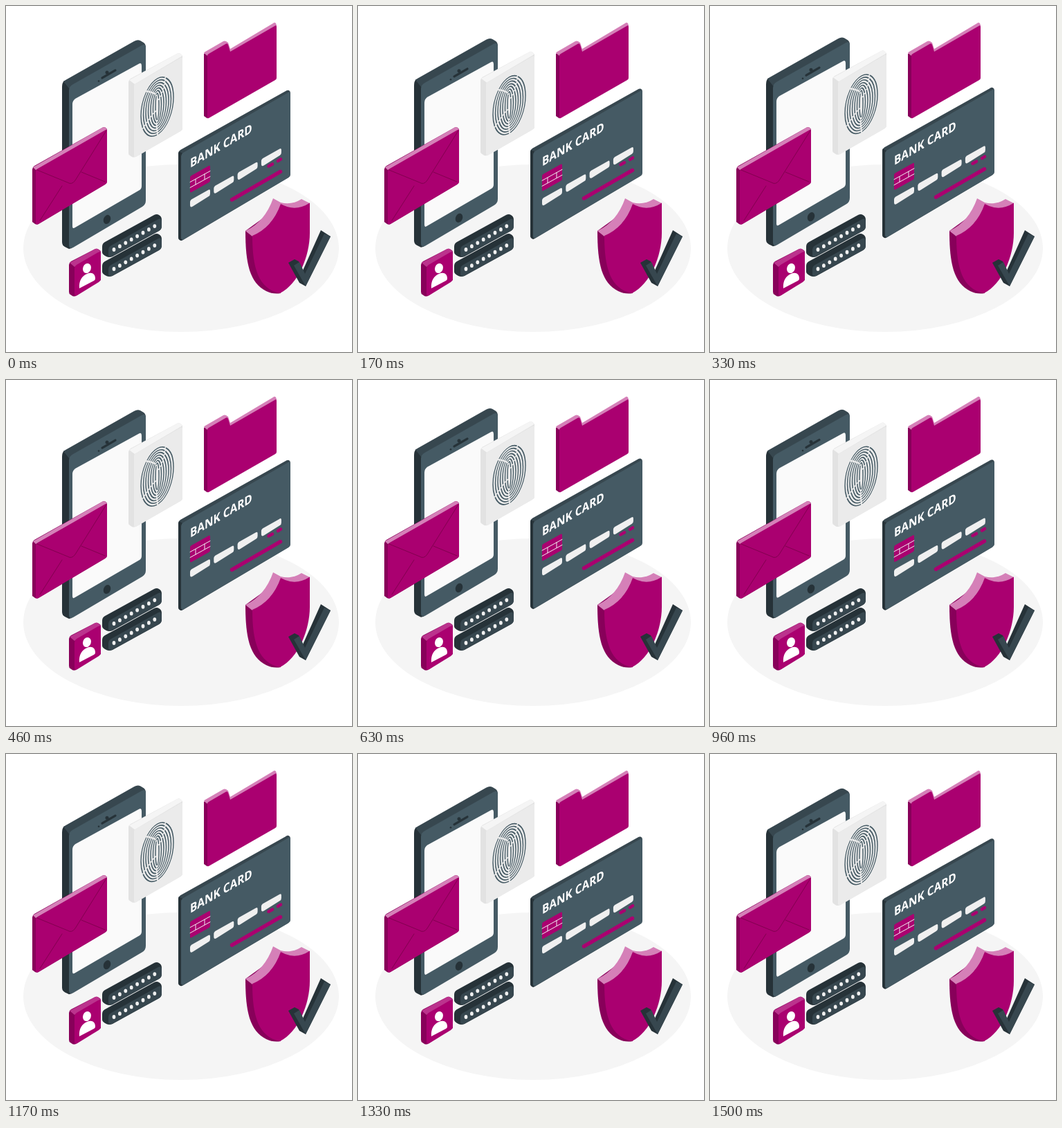
Recreate the animation shown at these times as an HTML page. Size 500x500 px, loop 1540 ms.

```html
<!DOCTYPE html>
<html lang="en">
<head>
<meta charset="utf-8">
<style>
html, body { margin: 0; height: 100%; overflow: hidden; background: #fff; }
svg { display: block; width: 100vw; height: 100vh; }
.front { fill: #455a64; }
.dark { fill: #37474f; }
.darkest { fill: #263238; }
.pink { fill: #aa0070; }
.pink-side { fill: #88005a; }
.pink-top { fill: #d580b8; }
.light { fill: #f0f0f0; }
.line { fill: none; stroke-linecap: round; stroke-linejoin: round; }
text { font: 600 17.8px "Noto Sans", "Open Sans", sans-serif; fill: #fff; }
</style>
</head>
<body>
<svg viewBox="0 0 500 500">
  <ellipse cx="253" cy="350" rx="228" ry="121" fill="#f5f5f5"/>

  <g class="float">
    <!-- phone -->
    <path class="darkest" d="M81 117Q81 111 84 108L95 113V350L91 351L85 348Q81 346 81 341Z"/>
    <path class="dark" d="M83 109L86 107L185 51Q190 48 194 50L199 53Q202 55 202 60L97 120L91 119Z"/>
    <path class="front" d="M91 122Q91 116 97 113L196 57Q202 54 202 61V281Q202 287 197 290L97 349Q91 352 91 345Z"/>
    <path fill="#fafafa" d="M96 142Q96 137 100 134L192 83.500Q196 81 196 87V260Q196 264 193 266L100 320Q96 323 96 318Z"/>
    <g class="darkest">
      <circle cx="146" cy="96" r="2.500"/>
      <circle cx="134" cy="108.500" r="1.300"/>
      <ellipse cx="146" cy="308.500" rx="5" ry="6.800" transform="rotate(22 146 308.500)"/>
    </g>
    <path class="line" stroke="#263238" stroke-width="3.200" d="M139 104L158 93"/>

    <!-- fingerprint tile -->
    <path fill="#e2e2e2" d="M177 110Q177 107 180 105L247 69Q250 67 252 69L255 72V177Q255 179 252 181L187 218Q184 219 182 218L179 216Q177 215 177 213Z"/>
    <path fill="#f5f5f5" d="M178 107L247 69Q250 67 252 69L255 72L186 113Z"/>
    <path fill="#ebebeb" d="M185 115Q185 113 188 112L252 75Q255 73 255 76V177Q255 179 252 181L188 218Q185 219 185 216Z"/>
    <g id="print" class="line" stroke="#455a64" stroke-width="1.400" transform="matrix(1 -.577 0 1 218.500 145.500)"/>
  </g>

  <!-- envelope -->
  <path class="pink-side" d="M38 236Q38 233 41 231L139 176Q142 174 144 176L146 178V254Q146 256 143 258L47 315Q44 316 42 315L38 312Z"/>
  <path class="pink-top" d="M39 233L139 176Q142 174 144 176L146 179L43 237Z"/>
  <path class="pink" d="M43 239Q43 237 46 235L143 179.500Q146 177.500 146 181V254Q146 256 143 258L47 315Q43 317 43 313Z"/>
  <path class="line" stroke="#82004f" d="M45 237L89 255Q95 259 100 252L145 180M49 310L81 260M143 254L109 240"/>

  <!-- bank card -->
  <g class="float">
    <path class="dark" d="M249 213Q249 210 252 208L404 123Q407 121 409 122Q411 123 411 126V243Q411 246 408 248L256 338Q253 340 251 338Q249 337 249 334Z"/>
    <path class="darkest" d="M249 213L250 210L255 213V338L253 339Q249 338 249 334Z"/>
    <path class="front" d="M253 217Q253 214 256 212L408 125Q411 123 411 127V243Q411 246 408 248L257 337Q253 339 253 335Z"/>
    <text transform="matrix(.866 -.5 0 1 266 234)">BANK CARD</text>
    <path class="pink" d="M266 248Q266 246 268 245L293 231Q295 230 295 232V252Q295 254 293 255L268 269Q266 270 266 268Z"/>
    <path class="line" stroke="#f0f0f0" d="M266 254.500L295 238.500M266 262.500L295 246.500M274 250.500V258M287 243V250.500"/>
    <g id="bars" class="light"></g>
    <path class="line" stroke="#aa0070" stroke-width="5.500" d="M326.500 280L396.500 239.500"/>
    <path class="line" stroke="#aa0070" stroke-width="4.500" d="M379.500 231.500L385 228.500M393 224L397 221.500"/>
  </g>

  <!-- folder -->
  <path class="pink-side" d="M286 69L291 68V162.500L286 159Z"/>
  <path class="pink-top" d="M286 68Q286 67 288 66L314 51Q316 50 318 51L321 53L324 62L386 25Q388 23 390 25L391 28L324 68L291 72Z"/>
  <path class="pink" d="M291 71.500Q291 70 293 69L318 54.500Q320 53.500 321 56L324 66L389 28.500Q391 27 391 30V104Q391 106 389 107L293 162Q291 163 291 161Z"/>

  <!-- user tile -->
  <path class="pink-side" d="M91 374Q91 371 94 369L129 351Q132 350 134 352Q137 353 137 356V396L101 419Q98 420 96 419L93 417Q91 416 91 413Z"/>
  <path fill="#bb338d" d="M92 371L129 351Q132 350 134 352L137 355L99 377Z"/>
  <path class="pink" d="M99 379Q99 376 102 374L133 356Q137 354 137 358V394Q137 397 134 399L103 418Q99 420 99 416Z"/>
  <g fill="#fff">
    <ellipse cx="117" cy="379" rx="5.800" ry="7.200" transform="rotate(20 117 379)"/>
    <path d="M106 408C105 397 110 390 117 387C124 384 129 387 129 394Q129 396 127 397Z"/>
  </g>

  <g id="passwords"></g>

  <!-- shield -->
  <path class="pink-side" d="M346 325L397 288V415Q386 417 376 412C352 400 346 372 346 325Z"/>
  <path class="pink-top" d="M346 325Q374 312 386 278L397 284Q413 288 427 279L439 285Q417 299 397 288Q384 321 356 333Z"/>
  <path class="pink" d="M356 332Q385 320 397 286Q418 298 439 284.500V328C439 362 422 402 396 415C365 409 356 379 356 332Z"/>

  <!-- check mark -->
  <path class="darkest" d="M408 371L417 366L423 369L429 382L455 324L469 333L433 405L424 400Z"/>
  <path class="dark" d="M416 375L424 370L432 387L460 329L469 333L433 405Z"/>
</svg>
<script>
const $ = id => document.getElementById(id);
const range = (n, draw) => Array.from({ length: n }, (_, i) => draw(i)).join('');

// Evenly spaced oval ridges, broken by small gaps.
$('print').innerHTML = range(7, k => {
  const r = 2.5 + k * 3.5;
  const dashes = `${19 + k * 5} 3 ${11 + k * 3} 3`;
  return `<ellipse rx="${r}" ry="${r + 17}" stroke-dasharray="${dashes}"/>`;
});

$('bars').innerHTML = range(4, i =>
  `<path transform="translate(${i * 34.3} ${i * -19.7})"
    d="M266 283Q266 281 268 279.500L292 266Q295 264 295 267V271Q295 274 293 275L270 289.500Q266 292 266 288Z"/>`);

const dots = range(8, i => `<ellipse cx="${156 + i * 8.4}" cy="${352 - i * 4.85}" rx="2.400" ry="2.900"/>`);
$('passwords').innerHTML = range(2, i => `<g transform="translate(0 ${i * 28})">
  <path class="darkest" d="M139 348Q139 343 143 341L214 302Q218 300 221 302Q225 304 225 309V318Q225 323 221 325L154 362Q149 364 145 362Q139 359 139 356Z"/>
  <path class="dark" d="M148 353Q148 348 152 346L220 308Q225 306 225 311V318Q225 323 221 325L153 362Q148 364 148 359Z"/>
  <g class="light">${dots}</g></g>`);

const LOOP = 1540, STEPS = 37, RISE = 10;
const floating = document.querySelectorAll('.float');

// Constant-speed rise and fall, stepped at 24 pictures a second.
function render() {
  const step = Math.floor(performance.now() % LOOP / LOOP * STEPS);
  const phase = (step + 1) / STEPS;
  const lift = RISE * (1 - Math.abs(1 - 2 * phase));
  floating.forEach(g => g.setAttribute('transform', `translate(0 ${.5 - lift})`));
  requestAnimationFrame(render);
}
render();
</script>
</body>
</html>
```
